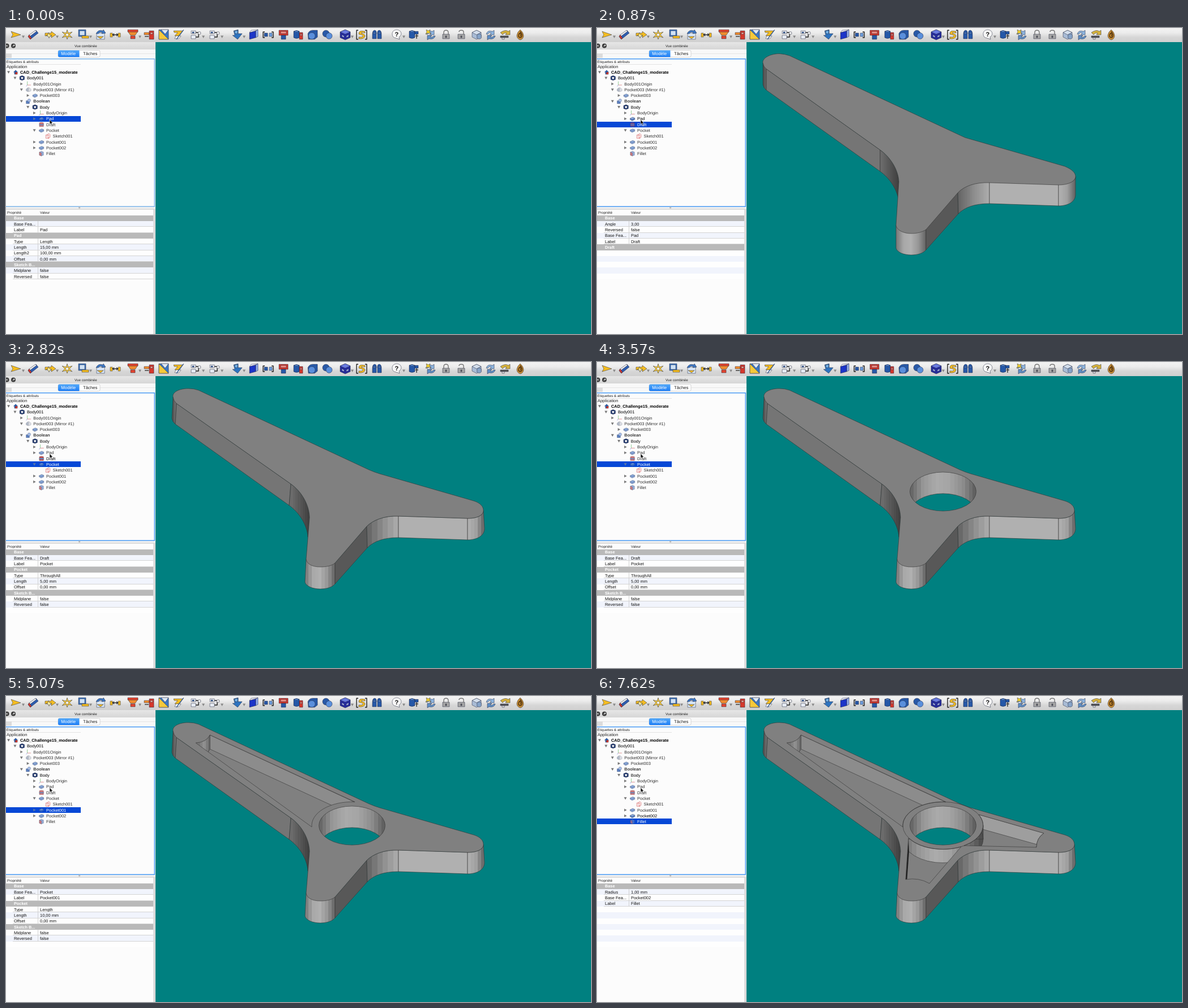
Write an HTML page with a canvas that moves like this. It is 1033 px wide and 542 px high and loops after 8 s.

```html
<!DOCTYPE html>
<html lang="fr">
<head>
<meta charset="utf-8">
<style>
html, body { margin: 0; width: 100%; height: 100%; overflow: hidden; background: #fff }
canvas { display: block }
</style>
</head>
<body>
<canvas id="stage" width="1033" height="542"></canvas>
<script>
const c = document.getElementById('stage').getContext('2d');
const LOOP = 8000, ROW = 10.3, FONT = '"Liberation Sans", Arial, sans-serif';
const BLUE = '#0648d6', EDGE = '#333';

// ---------- drawing helpers ----------
function box(x, y, w, h, col) { c.fillStyle = col; c.fillRect(x, y, w, h); }
function shape(d, fill, line, w = .6) {
  const p = new Path2D(d);
  if (fill) { c.fillStyle = fill; c.fill(p); }
  if (line) { c.strokeStyle = line; c.lineWidth = w; c.stroke(p); }
}
function text(s, x, y, col = '#111', size = 7.45, weight = '') {
  c.font = `${weight} ${size}px ${FONT}`;
  c.fillStyle = col;
  c.fillText(s, x, y + size * .36);
}
function fade(y0, y1, ...cols) {
  const g = c.createLinearGradient(0, y0, 0, y1);
  cols.forEach((col, i) => g.addColorStop(i / (cols.length - 1), col));
  return g;
}
// Horizontal grey ramp cut into n flat facets
function facets(x0, x1, greys, n) {
  const g = c.createLinearGradient(x0, 0, x1, 0);
  for (let i = 0; i < n; i++) {
    const p = (i + .5) / n * (greys.length - 1), j = Math.floor(p);
    const v = Math.round(greys[j] + (greys[j + 1] - greys[j]) * (p - j));
    g.addColorStop(i / n, `rgb(${v},${v},${v})`);
    g.addColorStop((i + 1) / n, `rgb(${v},${v},${v})`);
  }
  return g;
}
// "fill|path" or "~stroke|path" parts joined by ";" around a centre
function icon(x, y, parts, scale = 1, alpha = 1) {
  c.save();
  c.translate(x, y);
  c.scale(scale, scale);
  c.globalAlpha = alpha;
  for (const part of parts.split(';')) {
    const [col, d] = part.split('|');
    if (col[0] === '~') shape(d, null, col.slice(1), 1.4);
    else shape(d, col, '#1c2238', .5);
  }
  c.restore();
}
function triangle(x, y, open, col = '#777') {
  shape(open ? `M${x - 2.5},${y - 2}h5l-2.5,4.5z` : `M${x - 2},${y - 2.5}v5l4.5,-2.5z`, col);
}

// ---------- toolbar ----------
const refresh = '#8db4de|M-8,-1Q-6,-9 3,-6L6,-8V0H-2L1,-3Q-4,-5 -5,-1Z;#5f8fc6|M8,2Q6,9 -3,7L-6,9V1H2L-1,4Q4,5 5,2Z';
const arrow = '#f5bd20|M-9,-6L8,0L-9,5L-6,0Z';
const cubes = '#e9eef6|M-9,-7h8v5h-8z;#e9eef6|M-9,1h8v6h-8z;#2f67b5|M-7,-5h3v2h-3z;~#222|M-1,-4H4V4H-1;#eee|M3,-3a2.5,2.5 0 1 0 5,0a2.5,2.5 0 1 0 -5,0';
const lock = '#a5a5a5|M-6,-1H6V7H-6Z;#666|M-1,2h2v3h-2z;';
const barrel = '#2457a8|M-8,-6Q-3,-9 2,-6V5Q-3,8 -8,5Z;#5a8fdc|M-8,-6Q-3,-9 2,-6Q-3,-3 -8,-6;';
const cone = '#f08c2e|M-9,-6H9L4,1H-4Z;#e2452f|M-9,-9H9V-5H-9Z;#e2452f|M-4,2H4V7H-4Z';
const tools = [
  [18, arrow, 1],
  [48, '#2d5cae|M-9,3L5,-8L9,-3L-5,8Z;#eee|M-8,1L4,-8L6,-6L-6,3Z;#d5382c|M-9,3L-7,0L-3,6L-5,8Z'],
  [78, '#f5bd20|M-9,-3H2V-6L10,0L2,5V2H-9Z;#fff0a0|M-3,-4L-1,0L3,1L-1,3L-2,6L-4,2L-7,1L-4,0Z', 1],
  [108, '#f5c83a|M0,-9L2,-3L9,-5L4,0L9,5L2,3L0,8L-2,3L-9,5L-4,0L-9,-5L-2,-3Z;#fff|M-3,0L0,-3L3,0L0,3Z'],
  [137, '#3c77c4|M-9,-9H4V3H-9Z;#cfe2f6|M-7,-7H2V1H-7Z;#f5bd20|M-3,2H9V6H-3Z', 1],
  [167, '#d9e7f7|M-7,-3H7V8H-7Z;#3c77c4|M-8,-2Q-4,-10 4,-7L5,-9L9,-3L2,-2L3,-4Q-2,-6 -4,-2Z;#f5bd20|M-6,3H5L0,7Z'],
  [193, '#f5bd20|M-9,-3H-5V4H-9Z;#f5bd20|M5,-3H9V4H5Z;~#333|M-5,0H5M-2,-2L-5,0L-2,2M2,-2L5,0L2,2'],
  [224, cone, 1],
  [253, '#f08c2e|M-9,-4H0V0H-9Z;#d5382c|M0,-7H8V8H0Z;#f7a998|M2,-4H6V-1H2Z;~#333|M-8,3H-1'],
  [279, '#3c77c4|M-9,-9H8V8H-9Z;#f5c83a|M-9,-9L8,8H-9Z;#dfe9f4|M-5,-9H8L2,-1Z'],
  [305, '#f5bd20|M-9,-7H7L9,-9L0,2H-7L-2,-4H-8Z;#fff|M-5,2H4L0,7H-7Z;~#3c5f90|M8,-8L-4,8'],
  [336, cubes, 1],
  [369, cubes, 1],
  [408, '#2e73bf|M-6,-7L2,-9V-2H9L1,8L-8,1H-4Z;#75b4ea|M-5,-6L1,-8V-2H-3Z', 1],
  [437, '#1c35c8|M-7,-4L4,-7V5L-7,8Z;#eef|M-7,-4L-4,-8L8,-9L4,-7Z;#8fa8ea|M4,-7L8,-9V3L4,5Z'],
  [463, '#2859a8|M-7,-3H-1V3H-7Z;#6d9fe0|M2,-3H7V3H2Z;~#222|M-6,-5H-9V5H-6M6,-5H9V5H6'],
  [490, '#d5382c|M-8,-8H8V1H-8Z;#ef8d82|M-5,-6H5V-2H-5Z;#2859a8|M-4,1H4V8H-4Z'],
  [516, barrel + '#d5382c|M2,-4H8V8H2Z;#f7a998|M4,-2H6V2H4Z'],
  [542, '#2859a8|M-9,-2Q-6,-9 2,-8H8V4L3,8H-8Z;#5a8fdc|M-8,2a6,6 0 1 1 12,0a6,6 0 1 1 -12,0'],
  [568, '#2859a8|M-9,-2a6,6 0 1 1 12,0a6,6 0 1 1 -12,0;#5a8fdc|M-3,2a5.5,5.5 0 1 1 11,0a5.5,5.5 0 1 1 -11,0'],
  [599, '#262c9e|M-9,-5L0,-9L9,-5V5L0,9L-9,5Z;#6a7be0|M-9,-5L0,-9L9,-5L0,-1Z;#aab6f4|M-6,0L-2,2V5L-6,3Z;#aab6f4|M2,2L6,0V3L2,5Z', 1],
  [628, '~#222|M-6,-8H-9V8H-6M6,-8H9V8H6;#f5bd20|M6,-6Q-6,-9 -5,-1Q4,0 2,3Q0,5 -5,4V7Q6,8 6,1Q4,-2 -1,-3Q0,-5 6,-3Z'],
  [655, '#2859a8|M-8,0Q-8,-8 -4,-8Q0,-8 -1,0V7H-8Z;#2859a8|M1,0Q0,-8 4,-8Q8,-8 8,0V7H1Z;#5a8fdc|M-7,-4h5v2h-5z;#5a8fdc|M2,-4h5v2h-5z'],
  [690, '#f7f7f7|M-8,-1a8,7 0 1 1 12,5L5,8L-1,6Q-8,5 -8,-1Z', 1],
  [720, barrel + '#2457a8|M2,-6H8V-1H2Z;~#333|M3,2H8M5,-1V7'],
  [750, refresh + ';#f5d32e|M-8,-9L-4,-7L-1,-9L-2,-5L0,-2L-5,-3L-9,-1L-7,-5Z'],
  [777, lock + '~#777|M-4,-1V-4Q-4,-8 0,-8Q4,-8 4,-4V-1'],
  [804, lock + '~#777|M4,-1V-5Q4,-8 0,-8Q-4,-8 -4,-5'],
  [831, '#a9bcd6|M-8,-4L0,-8L8,-4V4L0,8L-8,4Z;#d3deec|M-8,-4L0,-8L8,-4L0,0Z;#86a3c8|M1,3a4,3 0 1 1 7,0a4,3 0 1 1 -7,0'],
  [856, refresh],
  [882, '#d6b23c|M-9,-4Q0,-10 5,-6L8,-8V0H0L2,-3Q-3,-4 -5,0Z;#555|M-9,2H5V5H-9Z;#ddd|M-6,5H-2V8H-6Z'],
  [908, '#c98f35|M0,-9Q6,-4 6,2Q5,8 0,9Q-6,7 -6,1Q-5,-5 0,-9Z;~#4e300d|M0,-6Q4,-1 3,3Q0,7 -3,3Q-3,-2 0,-3Q2,1 0,3']
];
function toolbar() {
  box(0, 0, 1033, 25, fade(0, 25, '#f3f3f3', '#ececec', '#d6d6d6', '#d0d0d0'));
  for (const [x, parts, menu] of tools) {
    icon(x, 12, parts);
    if (menu) triangle(x + 12.5, 15.5, true, '#888');
  }
  text('?', 686.5, 11, '#111', 11, 'bold');
}

// ---------- tree ----------
const art = {
  doc: '#2b5fb0|M-7,0L0,-7L7,0L4,0V7H-4V0Z;#d5382c|M-1,0H6V7H-1Z',
  body: '#20386e|M-8,-5L0,-8L8,-5V5L0,8L-8,5Z;#fff|M-5,-1L0,-4L5,-1L0,5Z',
  axes: '~#c44|M-4,4H8;~#4a4|M-4,4V-8;~#44c|M-4,4L-8,8',
  mirror: '#9aa6b8|M-8,-2L-1,-7V7L-8,4Z;#d5dae2|M1,-7L8,-2V4L1,7Z',
  pocket: '#5a7fc0|M-8,-1L1,-5L8,-2V3L-1,7L-8,3Z;#8fb0e4|M-8,-1L1,-5L8,-2L-1,2Z',
  bool: '#5a7fc0|M-8,-2H3V8H-8Z;#a8c0ea|M-3,-3a5,5 0 1 1 10,0a5,5 0 1 1 -10,0',
  draft: '#d0524f|M-7,-6Q0,-9 7,-6V7H-7Z;#6f8fc8|M-7,-2H7V3H-7Z',
  fillet: '#6f8fc8|M-7,-5L0,-8L7,-5V5L0,8L-7,5Z;#dd6a62|M-7,-5L0,-2V8L-7,5Z',
  sketch: '~#d03a3a|M-7,-4H3V7H-7ZM-2,-1a5,5 0 1 1 9,0a5,5 0 1 1 -9,0'
};
// depth, art, label, arrow (1 closed, 2 open), tone
const nodes = [
  [0, 'doc', 'CAD_Challenge15_moderate', 2, 'bold'],
  [1, 'body', 'Body001', 2, 'shown'],
  [2, 'axes', 'Body001Origin', 1],
  [2, 'mirror', 'Pocket003 (Mirror #1)', 2],
  [3, 'pocket', 'Pocket003', 1],
  [2, 'bool', 'Boolean', 2, 'heavy'],
  [3, 'body', 'Body', 2, 'shown'],
  [4, 'axes', 'BodyOrigin', 1],
  [4, 'pocket', 'Pad', 1],
  [4, 'draft', 'Draft', 0],
  [4, 'pocket', 'Pocket', 2],
  [5, 'sketch', 'Sketch001', 0],
  [4, 'pocket', 'Pocket001', 1],
  [4, 'pocket', 'Pocket002', 1],
  [4, 'fillet', 'Fillet', 0]
];
function tree(selected, shown, ring) {
  box(0, 25, 264, 517, '#f0f0f0');
  box(0, 25, 264, 13, fade(25, 38, '#e6e6e6', '#d6d6d6'));
  text('Vue combinée', 121, 31.7, '#222', 6.25);
  for (const x of [1.5, 13]) shape(`M${x - 4},31.5a4,4 0 1 0 8,0a4,4 0 1 0 -8,0`, '#3c3c3c');
  shape('M0,30l3,3m0,-3l-3,3M11.5,32h2v-2h1.5v2', null, '#fff', .9);
  box(0, 38, 264, 16, '#f8f8f8');
  box(0, 45, 10, 8, '#dcdcdc');
  box(10, 45, 254, .7, '#dddddd');
  c.beginPath(); c.roundRect(92, 39.5, 74, 12, 2.5);
  c.fillStyle = '#fff'; c.fill();
  c.strokeStyle = '#c4c4c4'; c.lineWidth = .7; c.stroke();
  c.beginPath(); c.roundRect(92, 39.5, 37.5, 12, [2.5, 0, 0, 2.5]);
  c.fillStyle = fade(39, 52, '#55aaf9', '#1a7bf6'); c.fill();
  text('Modèle', 97.3, 45.4, '#fff', 7.85);
  text('Tâches', 136, 45.4, '#222', 7.75);

  box(-2, 54, 265, 263, ring);
  box(0, 55.5, 261.5, 260, '#fcfcfc');
  text('Étiquettes & attributs', .8, 60, '#222', 6.2);
  box(0, 64, 132, .7, '#d8d8d8');
  text('Application', 1, 68.8, '#222');
  nodes.forEach(([depth, kind, label, fold, tone], i) => {
    const y = 78.3 + i * ROW, x = 4.5 + depth * 11.4, on = label === selected, live = tone || label === shown;
    if (on) box(0, Math.round(y - 5.2), 132, 10, BLUE);
    if (fold) triangle(x, y, fold === 2, on ? '#5b78a8' : '#777');
    icon(x + 12.5, y, art[kind], .53, on ? .5 : live ? 1 : .75);
    const col = on ? '#fff' : tone === 'heavy' ? '#3c3c3c' : live ? '#000' : '#303030';
    text(label, x + (depth ? 21 : 20.5), y, col, 7.45, tone === 'bold' || tone === 'heavy' ? 'bold' : '');
  });
  shape('M77,162.5v8l1.9,-1.7l1.3,3l1.4,-.6l-1.3,-2.9h2.5z', '#000', '#fff', .6);
}

// ---------- property list ----------
const padLike = (base, name, type, length, extra = []) => [
  '#Base', ['Base Fea...', base], ['Label', name], name === 'Pad' ? '#Pad' : '#Pocket',
  ['Type', type], ['Length', length], ...extra, ['Offset', '0,00 mm'],
  '#Sketch B...', ['Midplane', 'false'], ['Reversed', 'false']];
const props = {
  Pad: padLike('', 'Pad', 'Length', '15,00 mm', [['Length2', '100,00 mm']]),
  Draft: ['#Base', ['Angle', '3,00'], ['Reversed', 'false'], ['Base Fea...', 'Pad'], ['Label', 'Draft'], '#Draft'],
  Pocket: padLike('Draft', 'Pocket', 'ThroughAll', '5,00 mm'),
  Sketch001: ['#Attachment', ['Map Mode', 'FlatFace'], ['Map Rev...', 'false'], ['Map Path...', '0,00'],
    ['super Pla...', '[(0,00 0,00 1,00); 0,00 °; (0,00 mm  0,00 mm  0,00 mm)]', 1], '#Base',
    ['Placement', '[(0,00 0,00 1,00); 0,00 °; (0,00 mm  0,00 mm  15,00 mm)]', 1], ['Label', 'Sketch001'],
    '#Sketch', ['Constraints', '[19,50 mm]', 2], ['Const...', '19,50 mm', 3]],
  Pocket001: padLike('Pocket', 'Pocket001', 'Length', '10,00 mm'),
  Pocket002: padLike('Pocket001', 'Pocket002', 'Length', '10,00 mm'),
  Fillet: ['#Base', ['Radius', '1,00 mm'], ['Base Fea...', 'Pocket002'], ['Label', 'Fillet']]
};
function properties(rows) {
  shape('M128,318.2a1.6,1.6 0 1 0 3.2,0a1.6,1.6 0 1 0 -3.2,0', '#bbb');
  box(0, 320.5, 261.5, 222, '#c4c4c4');
  box(0, 321.5, 260.5, 221, '#fcfcfc');
  box(262, 320, 1.5, 222, '#d4d4d4');
  text('Propriété', 2, 326.8, '#222', 6.2);
  text('Valeur', 60, 326.8, '#222', 6.2);
  for (let i = 0; i < 11; i++) {
    const edge = 331.7 + i * ROW, y = edge + ROW / 2, row = rows[i];
    const top = Math.round(edge), high = Math.round(edge + ROW) - top;
    box(0, top, 260, high, i % 2 ? '#f1f4fc' : '#fefefe');
    if (!row) continue;
    if (typeof row === 'string') {
      box(0, top, 260, high, '#b9b9b9');
      text(row.slice(1), 14, y, '#fff', 7.3, 'bold');
      continue;
    }
    const [name, value, fold] = row, edit = fold === 3;
    if (edit) {
      box(0, top, 56, high, BLUE);
      box(60, top + 1, 19, high - 2, '#a9d2fb');
      shape(`M241.5,${y}a2.6,2.6 0 1 0 5.2,0a2.6,2.6 0 1 0 -5.2,0m1.4,-.6h2.4m-2.4,1.2h2.4`, '#e4e6fb', '#7078d8');
      shape(`M252.5,${top + .5}h6v9.3h-6z`, '#fff', '#bbb');
      shape(`M254,${y - 1.5}l1.5,-1.8l1.5,1.8M254,${y + 1.5}l1.5,1.8l1.5,-1.8`, null, '#333', .8);
    } else if (fold) triangle(5.5, y, fold === 2);
    text(name, edit ? 25.5 : 14, y, edit ? '#fff' : '#111');
    text(value, 60, y);
    box(12, top + high - 1, 248, 1, '#d4d4d4');
    box(56, top, 1, high, '#d0d0d0');
  }
}

// ---------- solid ----------
// k = 1 for upright walls, 0 for drafted ones; the foot stays the same
function solid(k) {
  const many = k ? 3 : 1, x = 503 - 3 * k, e = 536 - 3 * k, f = 530 - 2 * k, l = 295 - 2 * k, r = 843 + 2 * k;
  const bend = `C${x + 17},228 ${e - 1},250 ${e},${275 - 3 * k}`, tip = `${l + 6},${73.5 - k}`;
  const side = (d, x0, x1, greys, n = 1) => shape(d, facets(x0, x1, greys, n), EDGE);
  side(`M${l},62L293,100Q294,106 299,110L${tip}Z`, 293, 301, [76, 116], 3 * many);
  side(`M${tip}L${x},216L500,254L299,110Z`, 299, x, [117, 117]);
  side(`M${x},216${bend}L533,310C532,288 517,266 500,254Z`, x, e, [110, 62], 8 * many);
  side(`M${f},349L528,390C530,397 541,402 555,402C566,402 576,399 581,393L581,356Z`, 528, 581, [118, 168, 176, 150, 98], 9 * many);
  side('M581,356L637,291L638,329L581,393Z', 581, 638, [88, 88]);
  side('M637,291C648,280 668,272 693,273V311C668,311 650,317 638,329Z', 637, 693, [98, 140, 174], 6 * many);
  side('M693,273L815,277V315L693,311Z', 693, 815, [176, 176]);
  side(`M815,277C833,277 ${r},271 ${r},263L845,295C845,307 833,315 815,315Z`, 815, 845, [178, 160, 96], 5 * many);
  shape(`M${l},62C${l - 2},54 305,${47 - 1.5 * k} 322,${47 - 1.5 * k}Q332,${47 - k} 340,${50 - k}
    L640,${190.5 - k}Q650,195 660,${198 - k}L826,${246 - k}C838,250 ${r},256 ${r},263
    C${r},271 833,${277 + k} 815,${277 + k}L693,${273 + k}C668,${272 + k} 648,280 637,${291 + k}
    L581,${356 + k}C575,361 566,${363 + k} 555,${363 + k}C541,${363 + k} ${f + 1},358 ${f},349
    L${e},${275 - 3 * k}C${e - 1},250 ${x + 17},228 ${x},216L${tip}Q${l + 1},69 ${l},62Z`, '#808080', EDGE);
}
const oval = (rx, ry, dy = 0) => `M${611 - rx},${229.5 + dy}a${rx},${ry} 0 1 1 ${2 * rx},0a${rx},${ry} 0 1 1 ${-2 * rx},0z`;
function inside(d, draw) {
  c.save();
  c.clip(new Path2D(d));
  draw();
  c.restore();
  shape(d, null, EDGE);
}
function hole() {
  inside(oval(58.5, 34.5), () => {
    box(552, 194, 118, 72, facets(552, 670, [96, 150, 170, 164, 140, 90], 18));
    shape(oval(58.5, 34.5, 38), '#008080', EDGE);
  });
}
function armPocket() {
  inside('M335,83Q354,82 360,69L616,187.6A71,42 0 0 0 540,232Z', () => {
    box(330, 60, 300, 180, '#808080');
    shape('M360,69L616,188L576,194L360,94Z', '#8c8c8c', EDGE);
    shape('M330,83Q354,82 360,69V94L355,103Z', facets(340, 360, [112, 150, 98], 6), EDGE);
  });
}
function ringWall() {
  shape(oval(71, 42, 24) + 'M540,229.5h142v24h-142z', facets(540, 682, [110, 150, 172, 160, 120, 72], 18), EDGE);
}
function sidePockets() {
  inside('M674,210L789,243Q776,252 776,268L648,265A71,42 0 0 0 674,210Z', () => {
    box(640, 205, 150, 65, '#808080');
    shape('M674,210L789,243L777,263L670,233Z', '#9e9e9e', EDGE);
    shape('M789,243Q776,252 776,268L777,262Z', '#484848', EDGE);
    ringWall();
  });
  inside('M550,251.4L545,325Q568,321 587,332L643,267A71,42 0 0 1 550,251.4Z', () => {
    box(540, 245, 105, 90, '#808080');
    ringWall();
    shape('M550,251L545,325L547.5,324.5L551,276Z', '#202020');
  });
  shape(oval(71, 42), null, EDGE);
}

// ---------- timeline ----------
const selection = [[0, 'Pad'], [870, 'Draft'], [2820, 'Pocket'], [4320, 'Sketch001'], [4620, 'Pocket001'], [5820, 'Pocket002'], [7620, 'Fillet']];
const visible = [[0, ''], [570, 'Pad'], [1770, 'Draft'], [3570, 'Pocket'], [5070, 'Pocket001'], [6570, 'Pocket002']];
const at = (steps, t) => steps.findLast(s => s[0] <= t)[1];

function frame(now) {
  const t = now % LOOP, selected = at(selection, t);
  c.textRendering = 'geometricPrecision';
  c.lineJoin = 'round';
  box(264, 24, 769, 518, '#008080');
  toolbar();
  tree(selected, at(visible, t), t < 570 ? '#7db5ea' : '#4a9cf5');
  properties(props[selected]);
  if (t >= 300) solid(t < 1770 ? 1 : 0);
  if (t >= 5070) armPocket();
  if (t >= 6570) sidePockets();
  if (t >= 3570) hole();
  requestAnimationFrame(frame);
}
requestAnimationFrame(frame);
</script>
</body>
</html>
```
